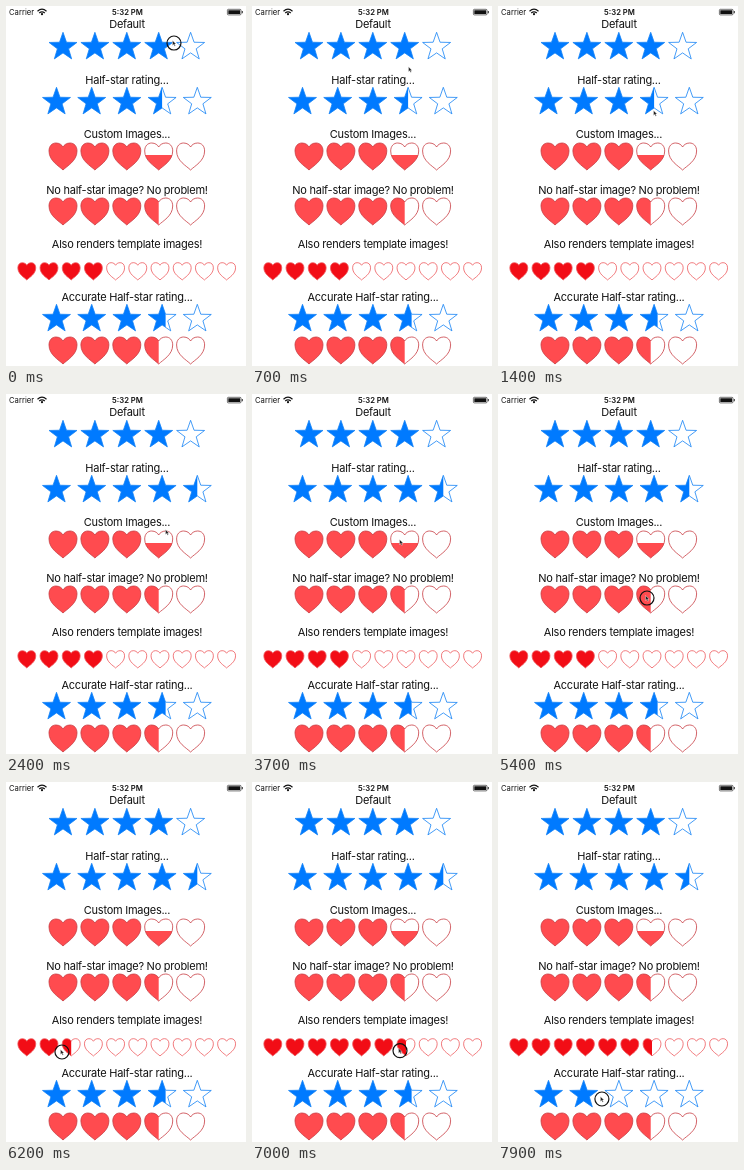
Write an HTML page that moves like this. It is 240 px wide and 360 px high and loops after 8000 ms.

```html
<!DOCTYPE html>
<html lang="en">
<head>
<meta charset="utf-8">
<title>Rating controls</title>
<style>
html, body { margin: 0; width: 100%; height: 100%; overflow: hidden; background: #fff; }
svg { display: block; width: 240px; height: 360px; }
text { font: 11px Inter, "Liberation Sans", sans-serif; letter-spacing: -.25px; text-anchor: middle; fill: #111; }
.status { font-size: 7.7px; letter-spacing: 0; }
</style>
</head>
<body>
<svg id="stage" viewBox="0 0 240 360">
  <text class="status" x="3" y="8.6" style="text-anchor:start">Carrier</text>
  <text class="status" x="121.5" y="8.6" style="font-weight:600">5:32 PM</text>
  <g fill="none" stroke="#111" stroke-width="1.2">
    <path d="M31.5 5.2Q36 1.2 40.5 5.2M33.2 7Q36 4.6 38.8 7"/>
    <circle cx="36" cy="8.2" r=".5"/>
  </g>
  <rect x="221.4" y="3.3" width="13.6" height="5.6" rx="1" fill="#fff" stroke="#111" stroke-width=".6"/>
  <path d="M222.3 4.2h11.8v3.8h-11.8zM235.8 5h.9v2.2h-.9z" fill="#111"/>
  <g id="rows"></g>
  <g id="cursor">
    <circle id="ring" r="7" fill="none" stroke="#111" stroke-width="1.2"/>
    <path d="M-1.5-2.5v5l1.2-1 .9 1.8 .9-.5-.9-1.7h1.6z" fill="#222" stroke="#fff" stroke-width=".4"/>
  </g>
</svg>
<script>
const LOOP = 8000;
const $ = id => document.getElementById(id);

const star = "M" + Array.from({ length: 10 }, (_, i) => {
  const r = i % 2 ? 5.9 : 14.7, a = i * Math.PI / 5;
  return (r * Math.sin(a)).toFixed(2) + " " + (-r * Math.cos(a)).toFixed(2);
}).join("L") + "Z";
const heart = "M0 14C-4 10-14 5-14-5C-14-10-11-13-7-13C-3.5-13-1-11 0-9C1-11 3.5-13 7-13C11-13 14-10 14-5C14 5 4 10 0 14Z";

const blue = { shape: star, fill: "#007aff", line: "#1683f5" };
const red = { shape: heart, fill: "#ff4b4f", line: "#c83c42" };
const tint = { shape: heart, fill: "#f20d16", line: "#ee5a5e", scale: .64 };

// x: first centre, drag: [start, end] of the touch that changes the value
const rows = [
  { ...blue, label: "Default", base: 22, x: 57, y: 41, step: 31.9, value: 4, mode: "whole", drag: [0, 500] },
  { ...blue, label: "Half-star rating...", base: 77.5, x: 50.5, y: 96, step: 35.2, value: 3.5, mode: "half", drag: [1500, 2150] },
  { ...red, label: "Custom Images...", base: 132, x: 57, y: 150, step: 31.9, value: 3.5, mode: "lower", drag: [2600, 3600] },
  { ...red, label: "No half-star image? No problem!", base: 187.5, x: 57, y: 205, step: 31.9, value: 3.5, mode: "half", drag: [4250, 5450] },
  { ...tint, label: "Also renders template images!", base: 242, x: 20.8, y: 265, step: 22.2, count: 10, value: 4, mode: "half", drag: [5850, 7050] },
  { ...blue, label: "Accurate Half-star rating...", base: 295, x: 50.5, y: 313, step: 35.2, value: 3.6, mode: "exact", drag: [7550, LOOP] },
  { ...red, x: 57, y: 344, step: 31.9, value: 3.5, mode: "half" }
];

// time, x, y
const path = [
  [0, 168, 37], [500, 160, 42], [1000, 155, 95], [1400, 157, 107], [1500, 158, 104],
  [2050, 185, 101], [2150, 185, 101], [2400, 161, 138], [2600, 155, 148],
  [3050, 95, 150], [3500, 149, 148], [3750, 149, 148], [4200, 150, 200], [4600, 106, 202],
  [4900, 85, 204], [5400, 149, 204], [5500, 149, 205], [5850, 86, 266], [6200, 56, 270],
  [6350, 52, 270], [6950, 148, 268], [7100, 148, 270], [7500, 152, 314], [7900, 104, 317], [LOOP, 95, 317]
];

function cursorAt(t) {
  const i = Math.max(1, path.findIndex(p => p[0] >= t));
  const [a, b] = [path[i - 1], path[i]];
  const k = (t - a[0]) / (b[0] - a[0]);
  return [a[1] + (b[1] - a[1]) * k, a[2] + (b[2] - a[2]) * k];
}

function valueAt(row, t) {
  if (!row.drag || t < row.drag[0]) return row.value;
  const [x] = cursorAt(Math.min(t, row.drag[1]));
  const v = (x - row.x) / row.step + .5;
  if (row.mode === "exact") return v;
  return row.mode === "whole" ? Math.ceil(v) : Math.ceil(v * 2) / 2;
}

function clipFor(row, v) {
  const left = row.x - row.step / 2;
  const box = (x, y, w) => `M${x} ${y}h${w}v${row.y + 20 - y}h${-w}z`;
  if (row.mode !== "lower") return box(left, row.y - 20, v * row.step);
  const full = Math.floor(v);
  return box(left, row.y - 20, full * row.step) +
    (v > full ? box(left + full * row.step, row.y - 1, row.step) : "");
}

$("rows").innerHTML = rows.map((r, n) => {
  const shapes = Array.from({ length: r.count || 5 }, (_, i) =>
    `<path transform="translate(${r.x + i * r.step} ${r.y}) scale(${r.scale || 1})" d="${r.shape}"/>`).join("");
  return (r.label ? `<text x="121" y="${r.base}">${r.label}</text>` : "") +
    `<clipPath id="clip${n}"><path id="fill${n}"/></clipPath>
    <g clip-path="url(#clip${n})" fill="${r.fill}">${shapes}</g>
    <g fill="none" stroke="${r.line}" stroke-width="${.8 / (r.scale || 1)}">${shapes}</g>`;
}).join("");

function draw() {
  const t = performance.now() % LOOP;
  rows.forEach((r, n) => $("fill" + n).setAttribute("d", clipFor(r, valueAt(r, t))));
  $("cursor").setAttribute("transform", `translate(${cursorAt(t)})`);
  const touching = rows.some(r => r.drag && t >= r.drag[0] && t < r.drag[1]);
  $("ring").setAttribute("visibility", touching ? "visible" : "hidden");
  requestAnimationFrame(draw);
}
draw();
</script>
</body>
</html>
```
